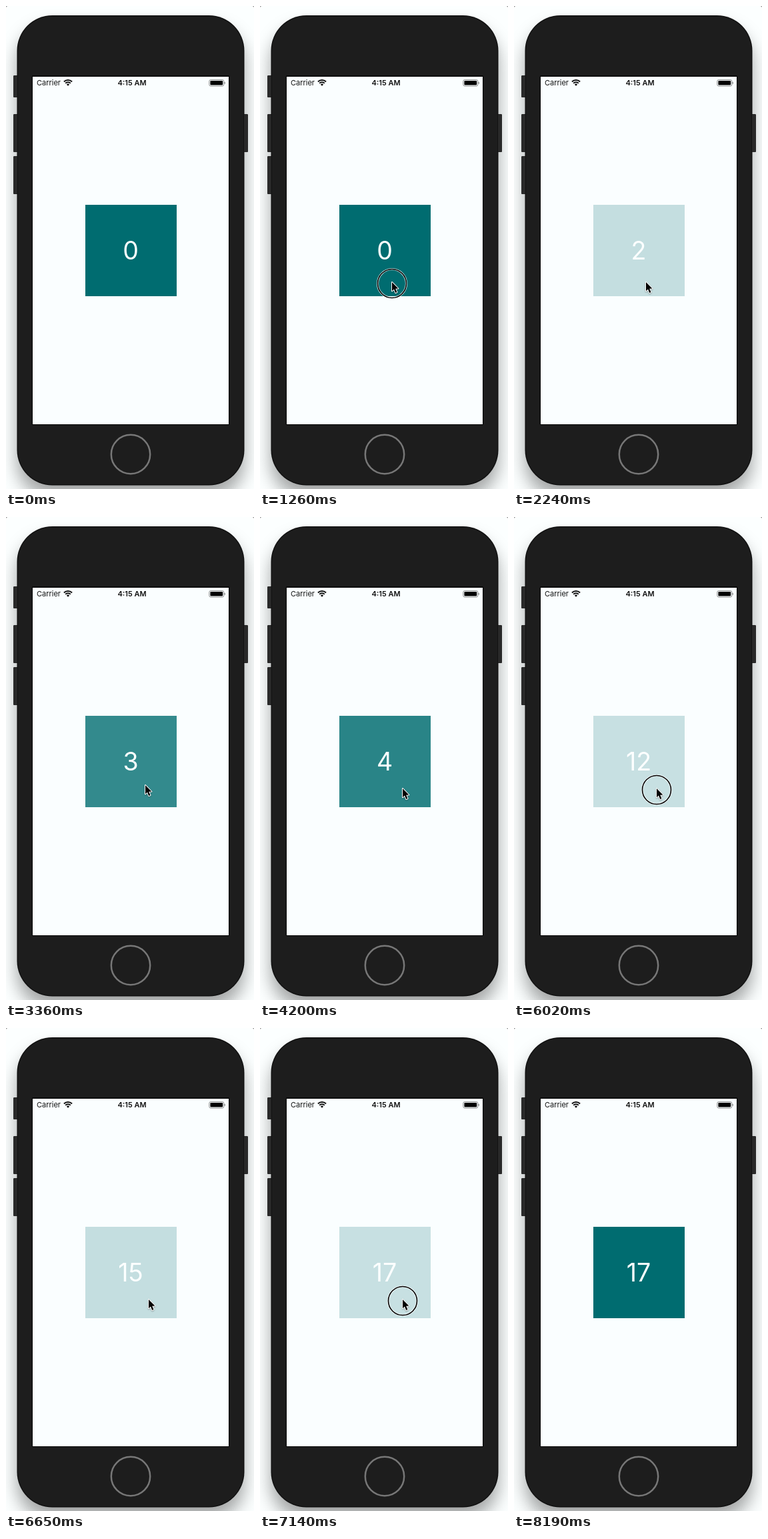
Write an HTML page with a canvas that moves like this. It is 372 by 724 pixels and loops after 8.4 s.

```html
<!DOCTYPE html>
<html lang="en">
<head>
<meta charset="utf-8">
<title>Tap counter</title>
<style>
  html, body { margin: 0; width: 100%; height: 100%; overflow: hidden; background: #fcffff; }
  canvas { display: block; width: 372px; height: 724px; }
</style>
</head>
<body>
<canvas id="stage" width="372" height="724"></canvas>
<script>
const ctx = document.getElementById('stage').getContext('2d');
const LOOP = 8400, STEP = 70, FADE = 250;
const FONT = 'Inter, Roboto, sans-serif';

// Moments at which the button is released and the counter goes up.
const slowTaps = [1300, 2215, 3199, 4030, 4875];
const fastTaps = Array.from({ length: 7 }, (_, i) => 4875 + 162 * (i + 1));
const taps = [...slowTaps, ...fastTaps, 6215, 6420, 6625, 6850, 7130];

// Pointer path: time, x, y.
const path = [
  [280, 250, 724], [980, 198, 414], [2500, 198, 414], [2940, 209, 402],
  [3430, 209, 402], [3850, 214, 407], [7840, 214, 407], [8085, 236, 726]
];

const ease = u => u < 0.5 ? 2 * u * u : 1 - 2 * (1 - u) * (1 - u);

function pointerAt(t) {
  const i = path.findIndex(p => p[0] > t);
  if (i < 1) return null;
  const [t0, x0, y0] = path[i - 1], [t1, x1, y1] = path[i];
  const u = ease((t - t0) / (t1 - t0));
  return [x0 + (x1 - x0) * u, y0 + (y1 - y0) * u];
}

function roundBox(x, y, w, h, r, color) {
  ctx.beginPath();
  ctx.roundRect(x, y, w, h, r);
  ctx.fillStyle = color;
  ctx.fill();
}

function circle(x, y, r, width, color) {
  ctx.beginPath();
  ctx.arc(x, y, r, 0, 2 * Math.PI);
  ctx.lineWidth = width;
  ctx.strokeStyle = color;
  ctx.stroke();
}

function label(text, x, y, font, color, align) {
  ctx.font = `${font} ${FONT}`;
  ctx.textAlign = align;
  ctx.fillStyle = color;
  ctx.fillText(text, x, y);
}

function drawPhone() {
  ctx.fillStyle = '#777';
  ctx.fillRect(0, 0, 372, 724);
  roundBox(0, 0, 372, 728, 3, '#fcffff');

  for (const [x, y, h] of [[11, 104, 33], [11, 162, 57], [11, 225, 57], [353, 162, 57]]) {
    roundBox(x, y, 10, h, 2, '#252525');
  }
  ctx.save();
  ctx.shadowColor = 'rgba(0,0,0,.36)';
  ctx.shadowBlur = 26;
  ctx.shadowOffsetY = 18;
  roundBox(16.5, 14, 341, 704.5, 53, '#111');
  ctx.restore();
  for (const [x, y, h] of [[11, 104, 33], [11, 162, 57], [11, 225, 57], [357, 162, 57]]) {
    roundBox(x, y, 6, h, 1.5, '#292929');
  }
  roundBox(18, 15.5, 338, 701.5, 51.5, '#1d1d1d');
  circle(187, 672, 29.2, 2.5, '#777');

  ctx.fillStyle = '#050505';
  ctx.fillRect(39, 104.5, 296, 523.5);
  ctx.fillStyle = '#fafeff';
  ctx.fillRect(40, 106, 294, 521);
}

function drawStatusBar() {
  label('Carrier', 46, 119, '11px', '#111', 'left');
  label('4:15 AM', 189, 119, '600 11px', '#111', 'center');

  ctx.strokeStyle = '#111';
  ctx.lineWidth = 1.9;
  for (const r of [8.6, 5.4]) {
    ctx.beginPath();
    ctx.arc(93, 119.6, r, -Math.PI * 0.75, -Math.PI * 0.25);
    ctx.stroke();
  }
  ctx.beginPath();
  ctx.moveTo(93, 119.8);
  ctx.arc(93, 119.8, 3, -Math.PI * 0.75, -Math.PI * 0.25);
  ctx.fillStyle = '#111';
  ctx.fill();

  ctx.beginPath();
  ctx.roundRect(304.8, 110.5, 22, 9.6, 2.4);
  ctx.lineWidth = 0.8;
  ctx.strokeStyle = '#777';
  ctx.stroke();
  roundBox(306.4, 112, 18.8, 6.6, 1, '#000');
  roundBox(327.6, 113.7, 1.2, 3.2, 0.6, '#888');
}

function drawButton(t) {
  const count = taps.filter(tap => tap <= t).length;
  const age = count ? t - taps[count - 1] : FADE;
  ctx.globalAlpha = 0.2 + 0.8 * ease(Math.min(1, age / FADE));
  ctx.fillStyle = '#006c70';
  ctx.fillRect(119, 298, 137, 137);
  ctx.globalAlpha = 1;
  label(count, 187, 380, '37.5px', '#fcffff', 'center');
}

function drawPointer(t) {
  const pos = pointerAt(t);
  if (!pos) return;
  const [x, y] = pos;
  if (taps.some(tap => t > tap - 80 && t < tap + 20)) {
    circle(x, y + 2, 21.5, 3.2, 'rgba(255,255,255,.8)');
    circle(x, y + 2, 21.5, 1.6, '#000');
  }
  ctx.save();
  ctx.translate(x, y);
  ctx.beginPath();
  for (const [px, py] of [[0, 0], [0, 13.2], [3, 10.5], [5.2, 16], [7.5, 15], [5.2, 9.8], [9.4, 9.6]]) {
    ctx.lineTo(px, py);
  }
  ctx.closePath();
  ctx.lineJoin = 'round';
  ctx.lineWidth = 2;
  ctx.strokeStyle = '#fff';
  ctx.shadowColor = 'rgba(0,0,0,.3)';
  ctx.shadowBlur = 2;
  ctx.shadowOffsetY = 1;
  ctx.stroke();
  ctx.shadowColor = 'transparent';
  ctx.fillStyle = '#000';
  ctx.fill();
  ctx.restore();
}

function frame() {
  const t = Math.floor((performance.now() - start) % LOOP / STEP) * STEP;
  drawPhone();
  drawStatusBar();
  drawButton(t);
  drawPointer(t);
  requestAnimationFrame(frame);
}

const start = performance.now();
frame();
</script>
</body>
</html>
```
